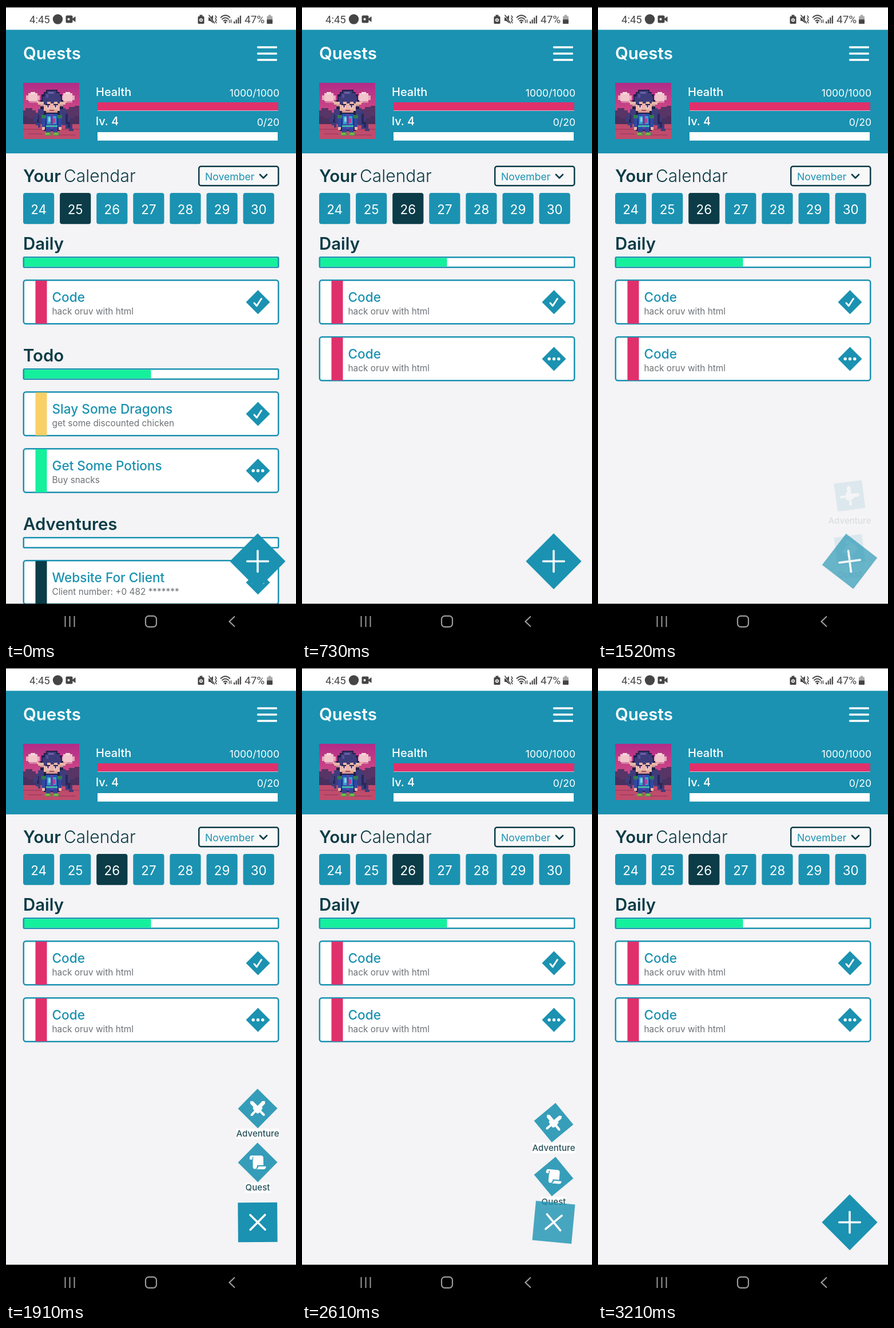
Recreate the animation shown at these times as an HTML page. Size 507 px wide and 1104 px high, loop 3.24 s.

```html
<!DOCTYPE html>
<html lang="en">
<head>
<meta charset="utf-8">
<title>Quests</title>
<style>
html, body { margin: 0; width: 100%; height: 100%; overflow: hidden; background: #f4f3f5; }
svg { display: block; width: 100vw; height: 100vh; }
text { font-family: Inter, sans-serif; font-optical-sizing: none; white-space: pre; }
</style>
</head>
<body>
<svg id="stage" viewBox="0 0 507 1104"></svg>
<script>
const LOOP = 3240;
const SWITCH = 490;
const TEAL = '#1b92b1', DARK = '#0b3c47', PINK = '#e0306c', GREEN = '#14f09c',
      YELLOW = '#f9d067', BG = '#f4f3f5', GREY = '#6e7276';

// Markup helpers
const rect = (x, y, w, h, fill, more = '') =>
  `<rect x="${x}" y="${y}" width="${w}" height="${h}" fill="${fill}" ${more}/>`;
const shape = (d, fill) => `<path d="${d}" fill="${fill}"/>`;
const line = (d, color, width, cap = 'round') =>
  `<path d="${d}" fill="none" stroke="${color}" stroke-width="${width}" stroke-linecap="${cap}" stroke-linejoin="${cap === 'round' ? 'round' : 'miter'}"/>`;
const text = (x, y, size, fill, str, weight = 400, anchor = 'start') =>
  `<text x="${x}" y="${y}" font-size="${size}" fill="${fill}" font-weight="${weight}" text-anchor="${anchor}">${str}</text>`;
const dot = (x, y, r, fill) => `<circle cx="${x}" cy="${y}" r="${r}" fill="${fill}"/>`;
const group = (id, body) => `<g id="${id}">${body}</g>`;
const outline = (x, y, w, h, color, fill, r) =>
  rect(x + 1.25, y + 1.25, w - 2.5, h - 2.5, fill, `rx="${r}" stroke="${color}" stroke-width="2.5"`);

function statusBar() {
  const ink = '#454545';
  const label = (x, size, str) =>
    `<text x="${x}" y="30" font-size="${size}" fill="${ink}" style="font-family:Roboto,sans-serif">${str}</text>`;
  return rect(0, 0, 507, 42, '#fff') + rect(0, 0, 507, 2.5, '#000') +
    label(41, 18.5, '4:45') + dot(90.5, 23, 8.7, ink) +
    rect(104.5, 16.5, 12, 13, ink, 'rx="2"') + shape('M115 23L121.5 18V28Z', ink) + dot(109.5, 23, 2, '#fff') +
    rect(335.5, 18, 11, 13, ink, 'rx="1.5"') + rect(338.5, 15.5, 5, 3, ink) +
    dot(341, 24.5, 3, '#fff') + dot(341, 24.5, 1.3, ink) +
    shape('M354 20H357L362 16V30L357 26H354Z', ink) + line('M354 16L365 30', '#fff', 2.6) +
    line('M355 16L364.5 30', ink, 1.6) + line('M366 17l2 2.5l-2 2.5l2 2.5l-2 2.5l2 2.5', ink, 1.5) +
    line('M375.5 20Q383.5 12.5 391.5 20M378 23Q383.5 18 389 23M380.5 26Q383.5 23.5 386.5 26', ink, 1.8) +
    dot(383.5, 28.6, 1.8, ink) + line('M390.5 29V24.5M393.5 24V29', ink, 1.4) +
    [0, 1, 2, 3].map(i => rect(398 + i * 3.6, 27 - i * 3.4, 2.2, 3.5 + i * 3.4, ink)).join('') +
    label(417, 19, '47%') + rect(456, 17.5, 10, 13.5, '#aaa', 'rx="1.5"') +
    rect(458.8, 15.5, 4.4, 2.5, '#aaa') + rect(456, 23.5, 10, 7.5, ink, 'rx="1"');
}

function avatar() {
  const hair = '#3f3c7c', shade = '#28275a', skin = '#e9b7a8', edge = '#23204a';
  const pair = (x, y, w, h, fill) => rect(80 - x - w, y, w, h, fill) + rect(80 + x, y, w, h, fill);
  const cloud = (x, y) => rect(x, y + 6, 24, 8, '#e9a9bd') + rect(x + 4, y + 2, 16, 14, '#f2c4cc') +
    rect(x + 8, y, 8, 4, '#f6d6d8') + rect(x + 6, y + 16, 14, 3, '#d67fa2');
  return `<g shape-rendering="crispEdges">` + rect(30, 134, 98, 98, 'url(#sky)') +
    cloud(35, 150) + cloud(96, 150) +
    shape('M30 182h4v-4h12v4h6v4h10v6h36v-6h6v-6h6v-4h10v-2h8v36h-98Z', '#573566') +
    shape('M30 192h8v4h10v4h64v-4h8v-4h8v16h-98Z', '#48305f') +
    rect(30, 206, 98, 26, '#c04c6c') + rect(30, 214, 98, 2, '#a83f66') + rect(38, 222, 26, 2, '#a83f66') +
    rect(92, 224, 30, 2, '#a83f66') +
    shape('M64 168h-4v12h-4v8h-4v6h-4v8h4v6h4v4h4v-6h8v-20ZM96 166h4v12h4v6h4v8h4v14h4v8h2v4h-8v-4h-6v-6h-6v-8h-6Z', hair) +
    shape('M56 190h2v14h-4v-6h2ZM104 188h4v14h4v10h-4v-6h-4Z', shade) +
    shape('M66 150h4v-4h20v4h4v4h4v10h2v16h-6v6h-28v-6h-6v-16h2v-10h4Z', edge) +
    shape('M68 152h4v-4h16v4h6v6h2v10h-32v-10h4Z', hair) +
    rect(74, 150, 10, 3, '#6964a8') + rect(70, 154, 4, 6, '#5650a0') +
    pair(14, 167, 10, 5, skin) + pair(23, 165, 3, 4, skin) + pair(14, 172, 6, 3, '#c98f90') +
    rect(66, 165, 28, 18, skin) + rect(70, 182, 20, 4, '#d79c95') +
    shape('M66 164h28v6h-4v-3h-6v3h-6v-3h-6v5h-6Z', hair) +
    pair(3, 171, 8, 2, edge) + pair(4, 173, 5, 5, '#f4ecf2') + pair(5, 173, 3, 4, '#8a3b86') +
    rect(76, 181, 8, 2, '#a24a60') +
    rect(66, 186, 28, 32, edge) + rect(70, 188, 20, 28, '#274fb0') +
    pair(10, 190, 8, 6, '#2f7d4f') + pair(11, 196, 6, 16, '#3348a0') + pair(12, 211, 5, 5, skin) +
    rect(72, 192, 16, 14, '#2fa4c8') + rect(74, 194, 4, 8, '#75d4e4') + rect(82, 196, 4, 8, '#b34392') +
    rect(78, 188, 4, 26, '#6a3ca0') + rect(70, 208, 20, 3, '#45b6a4') +
    pair(2, 214, 8, 8, '#3a3f96') + pair(2, 220, 10, 6, '#4a9c46') + pair(4, 222, 7, 2, '#8bc84a') + '</g>';
}

function header() {
  return rect(0, 41.5, 507, 215.5, TEAL) + text(30, 93, 29.5, '#fff', 'Quests', 600) +
    line('M440.5 72H472.5M440.5 83H472.5M440.5 94H472.5', '#fff', 3.4) + avatar() +
    text(157, 156.5, 20, '#fff', 'Health', 500) + text(478, 158, 17.6, '#fff', '1000/1000', 400, 'end') +
    rect(160, 168, 316, 15, '#e9b3c8') + rect(160, 168, 316, 14, PINK) +
    text(157, 208, 20, '#fff', 'lv. 4', 500) + text(478, 209, 17.6, '#fff', '0/20', 400, 'end') +
    rect(160, 220, 315, 14.7, '#fff');
}

function calendar() {
  let out = text(30, 307, 29.5, DARK, 'Your', 600) + text(101, 307, 30, DARK, 'Calendar', 300) +
    outline(336, 278.5, 141.5, 36, DARK, '#f8f8f9', 3.5) + text(348, 303.5, 17.6, TEAL, 'November') +
    line('M444 294L450 300L456 294', DARK, 2.6);
  for (let i = 0; i < 7; i++) {
    const x = 30 + i * 64.1;
    out += rect(x, 326, 54.2, 54.3, TEAL, `rx="4" id="day${i}"`) +
      text(x + 27.1, 362.5, 22.4, '#fff', 24 + i, 400, 'middle');
  }
  return out;
}

function section(y, title, done) {
  return text(30, y, 29.4, DARK, title, 600) + outline(29.5, y + 12, 448, 20, TEAL, '#fff', 1.5) +
    (done ? rect(32, y + 14.5, 443 * done, 15, GREEN) : '');
}

function card(y, color, title, note, done) {
  const cy = y + 39.5;
  const mark = done ? line(`M434 ${cy + 1.5}l4.3 5l8.2 -12.5`, '#fff', 3)
    : [-8.3, 0, 8.3].map(d => dot(440.5 + d, cy, 2.7, '#fff')).join('');
  return outline(29.5, y, 448, 78.5, TEAL, '#fff', 4) + rect(51.5, y + 2, 20, 75, color) +
    text(80.5, y + 38.5, 22.6, TEAL, title, 500) + text(80.5, y + 61, 15.4, GREY, note) +
    shape(`M440.5 ${cy - 21}l21 21l-21 21l-21 -21Z`, TEAL) + mark;
}

const hack = 'hack oruv with html';
const dayA = section(425, 'Daily', 1) + card(477, PINK, 'Code', hack, true) +
  section(620, 'Todo', .5) +
  card(672, YELLOW, 'Slay Some Dragons', 'get some discounted chicken', true) +
  card(771, GREEN, 'Get Some Potions', 'Buy snacks', false) +
  section(914, 'Adventures', 0) +
  card(966, DARK, 'Website For Client', 'Client number: +0 482 *******', false);
const dayB = section(425, 'Daily', .5) + card(477, PINK, 'Code', hack, true) +
  card(576, PINK, 'Code', hack, false);

// Menu icons, centred on 0,0
const sword = shape('M-12.5 -12.5H-8L4 -0.5L6.5 -3L8.5 -1L6 3.5L12 9.5V12.5H9L3.5 6.5L-1 8.5L-3 6.5L-0.5 4L-12.5 -8Z', '#fff');
const swords = `<g transform="scale(1.03)">${sword}<g transform="scale(-1 1)">${line('M-11 -11L8 8', TEAL, 6)}${sword}</g></g>`;
const scroll = shape('M-14 -8Q-14 -12 -10.5 -12H6Q10 -12 10 -7V5H-1Q-1 12 -6 11.5Q-8.5 11 -8.5 7V-5H-14Z', '#fff') +
  shape('M1 7H14.5Q14.5 12 10 12H-3Q1 11 1 7Z', '#fff') + line('M-8.5 -5V-9', TEAL, 1.4);

function item(id, y, name, icon, half) {
  return `<g transform="translate(440 ${y})">` + rect(-half, 35, half * 2, 18.5, '#fff') +
    group(id, rect(-24.4, -24.4, 48.8, 48.8, TEAL, 'transform="rotate(45)"') + icon) +
    text(0, 49, 15.1, DARK, name, 500, 'middle') + '</g>';
}

const navBar = rect(0, 1042.5, 507, 61.5, '#000') +
  line('M103.5 1064V1083M111.5 1064V1083M119.5 1064V1083', '#9a9a9a', 2, 'butt') +
  rect(244, 1063.8, 19, 19, 'none', 'rx="5.5" stroke="#9a9a9a" stroke-width="2.2"') +
  line('M400 1064.5L390.5 1073.5L400 1082.5', '#9a9a9a', 2.2, 'butt');

document.getElementById('stage').innerHTML =
  `<defs><linearGradient id="sky" x1="0" y1="0" x2="0" y2="1"><stop offset="0" stop-color="#b02c88"/><stop offset=".55" stop-color="#d04b86"/><stop offset="1" stop-color="#c04c6c"/></linearGradient></defs>` +
  rect(0, 0, 507, 1104, BG) + statusBar() + header() + calendar() +
  group('dayA', dayA) + group('dayB', dayB) +
  group('menu', item('adventure', 771, 'Adventure', swords, 37.5) + item('quest', 865, 'Quest', scroll, 22.5)) +
  `<g transform="translate(440 968.5)">` +
  group('fab', rect(-34.4, -34.4, 68.8, 68.8, TEAL, 'transform="rotate(45)"') +
    line('M-18.3 0H18.3M0 -18.3V18.3', '#fff', 3.6)) + '</g>' + navBar;

const el = id => document.getElementById(id);
const set = (id, name, value) => el(id).setAttribute(name, value);
const clamp = x => Math.min(1, Math.max(0, x));
const easeInOut = x => x < .5 ? 2 * x * x : 1 - 2 * (1 - x) * (1 - x);

// Damped spring from 0 to 1
function spring(ms) {
  if (ms <= 0) return 0;
  const s = ms / 1000;
  return 1 - Math.exp(-11 * s) * (Math.cos(10.5 * s) + 1.048 * Math.sin(10.5 * s));
}

// Button fades while pressed, then recovers
function press(ms) {
  if (ms < 0) return 1;
  return ms < 150 ? 1 - .8 * easeInOut(ms / 150) : .2 + .8 * easeInOut(clamp((ms - 150) / 250));
}

function draw(t) {
  const next = t >= SWITCH;
  set('dayA', 'display', next ? 'none' : 'inline');
  set('dayB', 'display', next ? 'inline' : 'none');
  set('day1', 'fill', next ? TEAL : DARK);
  set('day2', 'fill', next ? DARK : TEAL);

  const turn = spring(t - 1476) - spring(t - 2574);
  const lift = spring(t - 1476) - spring(t - 2555);
  set('fab', 'transform', `rotate(${-45 * turn})`);
  set('fab', 'opacity', t < 2200 ? press(t - 1450) : press(t - 2557));
  set('menu', 'transform', `translate(0 ${100 * (1 - lift)})`);
  set('menu', 'opacity', Math.min(.88, Math.max(0, (turn - .07) * 1.08)));
  for (const id of ['adventure', 'quest']) set(id, 'transform', `rotate(${45 * (1 - turn)})`);
}

const start = performance.now();
function tick() {
  draw((performance.now() - start) % LOOP);
  requestAnimationFrame(tick);
}
tick();
</script>
</body>
</html>
```
